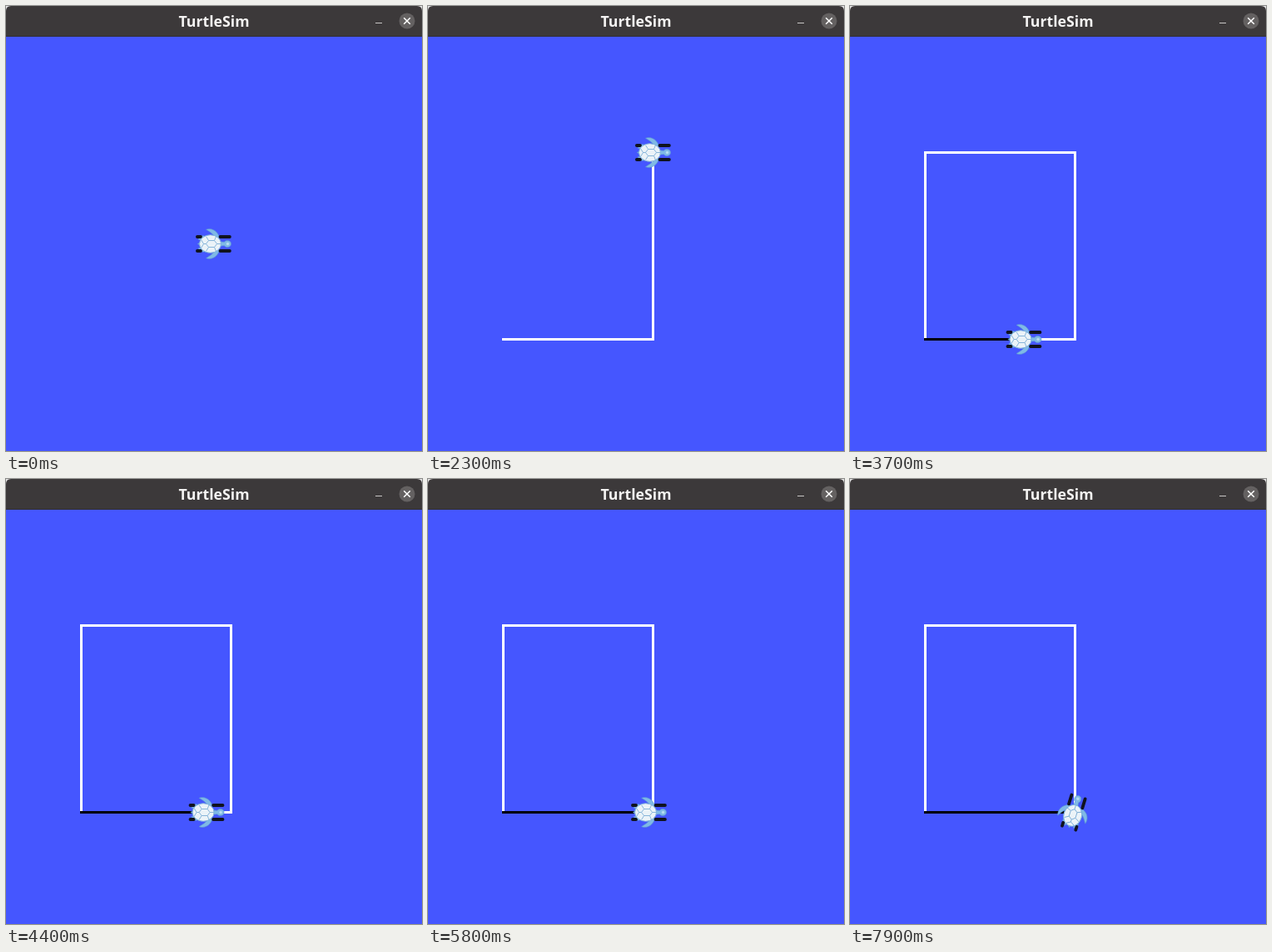
An HTML page for the animation above (8 s loop, 500 by 536 pixels).

```html
<!DOCTYPE html>
<html lang="en">
<head>
<meta charset="utf-8">
<title>TurtleSim</title>
<style>
  html, body { margin: 0; width: 100%; height: 100%; overflow: hidden; background: #4556ff; }
  svg { display: block; width: 500px; height: 536px; }
  .title { font: 700 17.7px "Open Sans", "Noto Sans", sans-serif; fill: #f4f3f2; text-anchor: middle; }
  .pen { fill: none; stroke-width: 3; stroke-linecap: square; stroke-linejoin: miter; }
  .skin { fill: #7fb9e6; stroke: #5a97d0; stroke-width: .6; }
  .paddle { fill: none; stroke: #10131f; stroke-width: 3.8; stroke-linecap: round; }
  .plates { fill: none; stroke: #7caed6; stroke-width: .9; }
</style>
</head>
<body>
<svg viewBox="0 0 500 536">
  <defs>
    <g id="side">
      <path class="skin" d="M-9-17.2C-5-19 1-17.5 4-13.5C6-11 7-9 6.5-7L1-7C1-11-3-13.5-9-17.2Z"/>
      <path class="skin" d="M-18-5C-18-8-14.5-10.3-11-9.5L-12-5Z"/>
      <path class="paddle" d="M8-8.5H19.4M-19.6-8.5H-15.5"/>
    </g>
  </defs>
  <rect y="36" width="500" height="500" fill="#4556ff"/>
  <rect width="500" height="12" fill="#e4e4e4"/>
  <path d="M0 37V6Q0 0 6 0H494Q500 0 500 6V37Z" fill="#3c393a"/>
  <rect y="36" width="500" height="1" fill="#302e30"/>
  <text class="title" x="250" y="25">TurtleSim</text>
  <rect x="444" y="20" width="8" height="1" fill="#c9c7c6"/>
  <circle cx="482" cy="18" r="9.5" fill="#646161"/>
  <path d="M478.2 14.2l7.6 7.6m0-7.6l-7.6 7.6" stroke="#fff" stroke-width="1.5"/>

  <path id="white" class="pen" stroke="#fff"/>
  <path id="black" class="pen" stroke="#000"/>

  <g id="turtle">
    <use href="#side"/>
    <use href="#side" transform="scale(1 -1)"/>
    <path class="skin" d="M-16-1.8L-19.3 0L-16 1.8Z"/>
    <path class="skin" d="M8-2.6L13-2.2C14-4.8 21-5 21 0C21 5 14 4.8 13 2.2L8 2.6Z"/>
    <circle cx="17" cy="0" r="1.7" fill="#b5dcf0"/>
    <ellipse cx="-4" cy="0" rx="13" ry="10.8" fill="#ebf3f8" stroke="#78aedb"/>
    <path class="plates" d="M-6-4H1L4 0L1 4H-6L-9 0ZM-6-4L-9-9M1-4L3-9M4 0H9M1 4L3 9M-6 4L-9 9M-9 0H-12L-15-5M-12 0L-15 5"/>
  </g>
</svg>
<script>
const LOOP = 8000, JUMP = 2300, DRIVE = 2600, TURN = 6310;
const L = 90.5, R = 270.5, T = 176.5, B = 401.5;
const byId = id => document.getElementById(id);
const white = byId('white'), black = byId('black'), turtle = byId('turtle');
const decay = (rate, ms) => Math.exp(-rate * ms / 1000);

// Proportional control: drive slows near the goal, then the heading eases to 90 degrees.
const driveX = t => Math.max(95.5, 274 - 116.5 * decay(.972, Math.min(t, TURN) - 3100));
const heading = t => t < TURN ? 0 : 90 * (1 - decay(1.05, t - TURN));

function pose(t) {
  if (t < JUMP) return [249.5, 286.5, 0];
  if (t < DRIVE) return [R, T, 0];
  return [driveX(t), B, heading(t)];
}

function render(t) {
  const [x, y, a] = pose(t);
  turtle.setAttribute('transform', `translate(${x} ${y}) rotate(${-a})`);
  const corner = `M${L} ${B}H${R}V${T}`;
  white.setAttribute('d', t < JUMP ? '' : t < DRIVE ? corner : corner + `H${L}Z`);
  black.setAttribute('d', t < DRIVE ? '' : `M${L} ${B}H${x}`);
}

function tick() {
  render(performance.now() % LOOP);
  requestAnimationFrame(tick);
}
tick();
</script>
</body>
</html>
```
